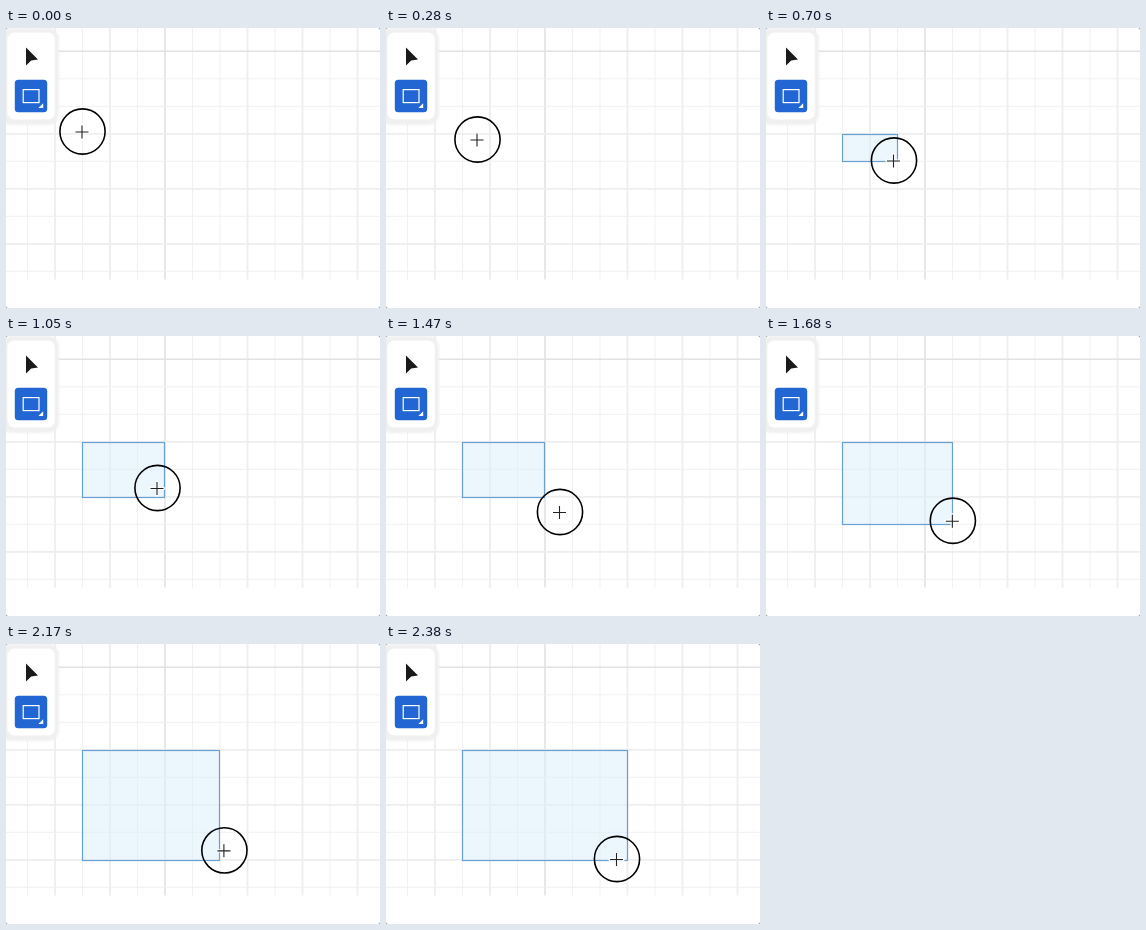
An HTML page that plays this animation: 374 px wide and 280 px high, repeating every 2450 ms.

```html
<!DOCTYPE html>
<html lang="en">
<head>
<meta charset="utf-8">
<title>Drawing a snapped rectangle</title>
<style>
  html, body { margin: 0; width: 100%; height: 100%; overflow: hidden; background: #777; }
  svg { display: block; width: 374px; height: 280px; background: #fff; border-radius: 2px; }
  .panel { fill: #fff; }
  .halo { fill: #f0f0f0; filter: blur(.8px); }
  .button { fill: #2166d3; }
  .icon { fill: none; stroke: #fff; stroke-width: 1.2; }
  .box { fill: rgba(220, 238, 251, .55); stroke: #6a9fd3; stroke-width: 1.2; }
  .ring { fill: none; stroke: #000; stroke-width: 1.6; }
  .cross { stroke: #222; stroke-width: 1.1; }
  .glow { stroke: #fff; stroke-width: 3.5; stroke-linecap: round; opacity: .85; }
</style>
</head>
<body>
<svg viewBox="0 0 374 280">
  <g id="grid"></g>
  <rect id="box" class="box"/>
  <g>
    <rect class="halo" x="-6" y="0" width="59" height="97" rx="11"/>
    <rect class="panel" x="1.4" y="4.5" width="47.4" height="87" rx="7"/>
    <path d="M20 19.5 L32 31.6 L25.2 32.4 L20 37.5 Z" fill="#1a1a1a"/>
    <rect class="button" x="8.8" y="51.8" width="32.4" height="32.4" rx="3.5"/>
    <rect class="icon" x="17.2" y="61.6" width="15.8" height="13"/>
    <path d="M37.2 75.3 V80 H32.4 Z" fill="#fff"/>
  </g>
  <g id="cursor">
    <circle class="ring" r="22.6"/>
    <path class="glow" d="M-7 .5 H6 M-.5 -6 V7"/>
    <path class="cross" d="M-7 .5 H6 M-.5 -6 V7"/>
  </g>
</svg>
<script>
const STEP = 70, STEPS = 35, CELL = 27.5;
const ORIGIN = [76.5, 106.5];

// Key points of the pointer: step, x, y
const KEYS = [
  [1, 76.5, 103.5], [4, 91.5, 111.5], [10, 128, 132.5], [15, 151.5, 152],
  [17, 157.5, 158.5], [18, 170.5, 171.5], [19, 170.5, 171.5],
  [21, 174, 176], [28, 204, 196.4], [33, 228, 213], [34, 231, 215]
];

const $ = id => document.getElementById(id);

function setAttrs(el, attrs) {
  for (const key in attrs) el.setAttribute(key, attrs[key]);
}

function drawGrid() {
  const line = (d, [stroke, width]) => {
    const el = document.createElementNS('http://www.w3.org/2000/svg', 'path');
    setAttrs(el, { d, stroke, 'stroke-width': width });
    $('grid').append(el);
  };
  const isMajor = n => n > 0 ? n > 1 && n % 2 === 1 : n % 2 === 0;
  const style = n => n === 0 ? ['#e2e2e2', 1.6]
    : isMajor(n) ? ['#eee', 1.8] : ['#f1f1f1', 1];
  for (let n = -5; n <= 7; n++) line(`M${159 + n * CELL} 0 V251.6`, style(n));
  for (let n = 0; n <= 8; n++) line(`M0 ${23.3 + n * CELL} H374`, style(n));
}

function pointer(step) {
  const s = Math.max(step, KEYS[0][0]);
  const i = Math.max(1, KEYS.findIndex(key => key[0] >= s));
  const [s0, ...from] = KEYS[i - 1], [s1, ...to] = KEYS[i];
  const k = (s - s0) / (s1 - s0);
  return from.map((v, axis) => v + (to[axis] - v) * k);
}

const crisp = v => Math.floor(v - .01) + .5;

function render(time) {
  const step = Math.floor(time / STEP) % STEPS;
  $('cursor').setAttribute('transform', `translate(${pointer(step)})`);

  // The box follows the pointer one step late, in whole cells.
  const [width, height] = pointer(step - 1).map((v, axis) => {
    const start = ORIGIN[axis];
    const cells = Math.max(0, Math.round((v - start) / CELL));
    return crisp(start + cells * CELL) - start;
  });
  setAttrs($('box'), {
    x: ORIGIN[0], y: ORIGIN[1], width, height,
    visibility: width && height ? 'visible' : 'hidden'
  });
}

drawGrid();
const start = performance.now();
function tick() {
  render(performance.now() - start);
  requestAnimationFrame(tick);
}
tick();
</script>
</body>
</html>
```
